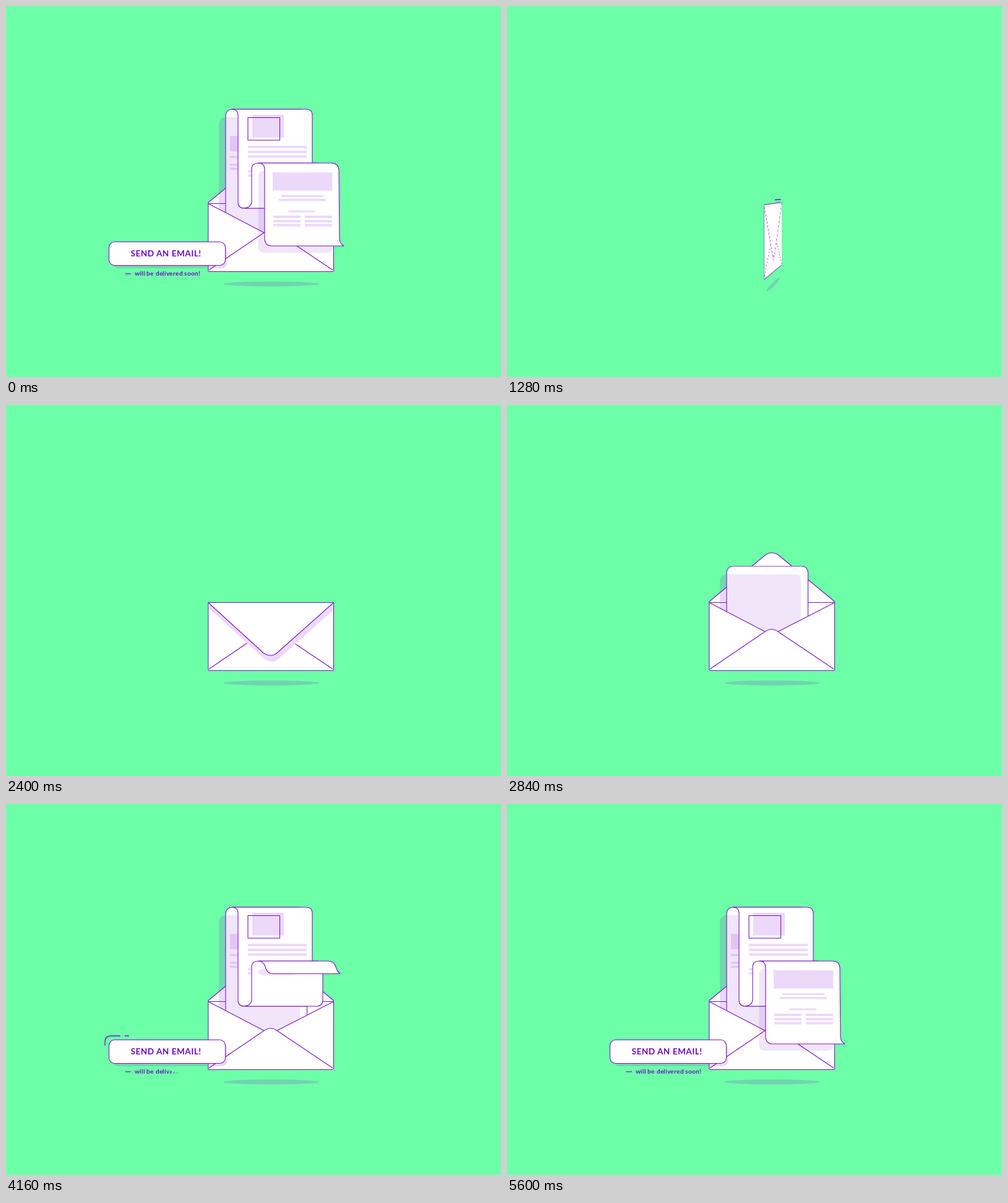
Write an HTML page without scripts that moves like this. It is 800 px wide and 600 px high and loops after 5640 ms.

```html
<!DOCTYPE html>
<html lang="en">
<head>
<meta charset="utf-8">
<title>Send an email</title>
<style>
:root { --ink: #7b16ca; --tint: #ecd9fa; --T: 5.64s linear infinite; }
html, body { margin: 0; width: 100%; height: 100%; overflow: hidden; background: #6effa9; }
body { position: relative; }
.layer { position: absolute; inset: 0; overflow: hidden; contain: paint; }
.layer > svg, .card, .card > svg { position: absolute; left: 0; top: 0; width: 800px; height: 600px; }
svg { display: block; }
.p { fill: #fff; stroke: var(--ink); stroke-width: 1.1; stroke-linejoin: round; }
.l { fill: none; stroke: var(--ink); stroke-width: 1.1; }
.t { fill: var(--tint); }
.v { fill: #7a14c9; fill-opacity: .11; }
.s { fill: #71d4b1; }

/* turning envelope */
.turn { perspective: 1111px; perspective-origin: 400px 300px; animation: turnOn 5.64s step-end infinite; }
.card { transform-style: preserve-3d; transform-origin: 428px 374.5px; animation: spin var(--T); }
.front, .back { backface-visibility: hidden; transform-origin: 428px 374.5px; }
.back { transform: rotateY(180deg); }
.zoom { transform-origin: 428px 374.5px; animation: zoom var(--T); }
.zoom.floor { transform-origin: 428.5px 449.5px; }
.wipe { animation: wipe var(--T); }
.stamp { transform-origin: 474.3px 341px; animation: stamp var(--T); }
.frame { animation: frame var(--T); }
.glint { animation: glint 5.64s step-end infinite; }
@keyframes turnOn { 0% { opacity: 0 } .71% { opacity: 1 } 28% { opacity: 0 } }
@keyframes spin {
  0%, 9.22% { transform: translateX(6.5px) rotateY(0deg) }
  11.35% { transform: translateX(5px) rotateY(0deg) }
  17.7% { transform: translateX(3.5px) rotateY(0deg); animation-timing-function: ease-in }
  21.28% { transform: translateX(3px) rotateY(-50deg) }
  22.7% { transform: translateX(3px) rotateY(-99deg); animation-timing-function: cubic-bezier(.2,.5,.5,1) }
  27.5%, 100% { transform: translateX(0) rotateY(-180deg) }
}
@keyframes zoom {
  0%, .7% { transform: scale(.3); animation-timing-function: ease-out }
  5% { transform: scale(1.12) }
  9.22% { transform: scale(1.07) }
  11.35% { transform: scale(1.035); animation-timing-function: ease-out }
  15%, 100% { transform: scale(1) }
}
@keyframes wipe {
  0%, 3% { transform: translate(-90px, -160px) }
  9.22% { transform: none }
  10.64%, 100% { transform: translate(20px, 35px) }
}
@keyframes stamp { 0%, 8% { transform: scale(0) } 9.22% { transform: scale(.47) } 11%, 100% { transform: scale(1) } }
@keyframes frame { 0%, 6% { stroke-dashoffset: 1 } 9%, 100% { stroke-dashoffset: 0 } }
@keyframes glint { 0% { opacity: 0 } 22% { opacity: 1 } 23.4% { opacity: 0 } }

/* resting envelope */
.mail { animation: mailOn 5.64s step-end infinite; }
@keyframes mailOn { 0% { opacity: 1 } .71% { opacity: 0 } 28% { opacity: 1 } }
.shut, .open { transform-origin: 428px 319.5px; }
.shut { animation: shut var(--T); }
.open { animation: open var(--T); }
@keyframes shut {
  0%, 1% { transform: scaleY(0); opacity: 0 }
  2%, 43.3% { transform: none; opacity: 1; animation-timing-function: ease-in }
  45% { transform: scaleY(0); opacity: 1 }
  45.1%, 100% { transform: scaleY(0); opacity: 0 }
}
@keyframes open {
  0%, 1% { transform: none }
  2%, 45% { transform: scaleY(0); animation-timing-function: ease-out }
  47.5% { transform: scaleY(1.1) }
  49%, 100% { transform: none }
}
.badge { transform-origin: 330px 319px; animation: badge var(--T); }
@keyframes badge {
  0%, 29.1% { transform: scale(0) }
  30.8% { transform: scale(1.15) }
  32.2%, 40.4% { transform: none }
  41.2% { transform: scale(1.12) }
  42.55%, 100% { transform: scale(0) }
}
.ring { stroke: #5a16b4; stroke-width: 1.3; animation: ring var(--T); }
@keyframes ring {
  0%, 30.5% { stroke-dasharray: 0 360; stroke-dashoffset: -90; opacity: 0 }
  30.6% { stroke-dasharray: 0 360; stroke-dashoffset: -90; opacity: 1 }
  32.6% { stroke-dasharray: 110 250; stroke-dashoffset: -95; opacity: 1 }
  34.75% { stroke-dasharray: 33 327; stroke-dashoffset: -188; opacity: 1 }
  36.2% { stroke-dasharray: 0 360; stroke-dashoffset: -226; opacity: 1 }
  36.3%, 100% { stroke-dasharray: 0 360; stroke-dashoffset: -226; opacity: 0 }
}
.tick { stroke: #5a16b4; animation: tick var(--T); transform-origin: center; transform-box: fill-box; }
@keyframes tick {
  0%, 31.5% { transform: scaleY(0) }
  33% { transform: scaleY(2.5) }
  34.75% { transform: none }
  35.6%, 100% { transform: scaleY(0) }
}

/* letter and its folds */
.rise { animation: rise var(--T); }
@keyframes rise {
  0%, 1% { transform: none }
  2%, 46.1% { transform: translateY(205px) }
  50.35% { transform: translateY(94px) }
  53.2% { transform: translateY(49px); animation-timing-function: ease-out }
  57% { transform: translateY(-8px) }
  59%, 100% { transform: none }
}
.fold1 { animation: fold1 var(--T); }
@keyframes fold1 {
  0%, 1%, 63.1%, 100% { opacity: 1; d: path("M365 167H485Q495 167 495 177V317Q495 327 485 327H385Q375 327 375 317V177Q375 167 365 167Z") }
  2%, 58.2% { opacity: 0; d: path("M365 167H485Q495 167 495 177V177Q495 187 485 187H385Q375 187 375 177V177Q375 167 365 167Z") }
  58.3% { opacity: 1; d: path("M365 167H485Q495 167 495 177V177Q495 187 485 187H385Q375 187 375 177V177Q375 167 365 167Z"); animation-timing-function: ease-in-out }
}
.fold2 { animation: fold2 var(--T); }
@keyframes fold2 {
  0%, 1%, 67.4%, 100% { opacity: 1; d: path("M385 327Q397 326 397 315V264Q397 254 408 254H502Q512 254 512 264V317Q512 327 502 327Z") }
  2%, 63.1% { opacity: 0; d: path("M385 327Q397 326 397 322V322Q397 317 408 317H502Q512 317 512 321V321Q512 327 502 327Z") }
  63.2% { opacity: 1; d: path("M385 327Q397 326 397 322V322Q397 317 408 317H502Q512 317 512 321V321Q512 327 502 327Z"); animation-timing-function: ease-in-out }
}
.fold3 { animation: fold3 var(--T); }
@keyframes fold3 {
  0%, 1%, 79%, 100% { opacity: 1; d: path("M408 254Q418 254 418 265L418 377Q419 388 429 388L546 388Q539 384 539 376L538 265Q537 254 526 254Z") }
  2%, 68% { opacity: 0; d: path("M408 254Q412 254 413 255L413 255Q414 257 418 257L514 257Q513 256 512 255L512 255Q511 254 508 254Z") }
  68.1% { opacity: 1; d: path("M408 254Q412 254 413 255L413 255Q414 257 418 257L514 257Q513 256 512 255L512 255Q511 254 508 254Z") }
  73.76% { opacity: 1; d: path("M408 254Q416 254 419 263L419 263Q422 274 431 274L540 274Q535 270 533 263L533 263Q530 254 520 254Z"); animation-timing-function: cubic-bezier(.3,.4,.4,1) }
}
.cast { animation: cast var(--T); }
@keyframes cast {
  0%, 1%, 79%, 100% { width: 121px; height: 133px }
  2%, 70% { width: 0; height: 0 }
  73.76% { width: 60px; height: 11px; animation-timing-function: cubic-bezier(.3,.4,.4,1) }
}
.fade1 { animation: fade1 var(--T); }
.fade2 { animation: fade2 var(--T); }
@keyframes fade1 { 0%, 1% { opacity: 1 } 2%, 61% { opacity: 0 } 64%, 100% { opacity: 1 } }
@keyframes fade2 { 0%, 1% { opacity: 1 } 2%, 76.6% { opacity: 0 } 79.5%, 100% { opacity: 1 } }
.grow1, .grow2 { transform-box: fill-box; transform-origin: 0 50%; }
.grow1 { animation: grow1 var(--T); }
.grow2 { animation: grow2 var(--T); }
@keyframes grow1 { 0%, 1% { transform: none } 2%, 62% { transform: scaleX(0) } 66%, 100% { transform: none } }
@keyframes grow2 { 0%, 1% { transform: none } 2%, 77.5% { transform: scaleX(0) } 82%, 100% { transform: none } }

/* button and caption */
.btn { transform-origin: 260px 400px; animation: btn var(--T); }
@keyframes btn {
  0%, 1% { transform: none }
  2%, 58.5% { transform: scale(0); animation-timing-function: ease-out }
  61.5% { transform: scale(1.06) }
  63%, 100% { transform: none }
}
.trace { stroke-width: 1.4; animation: trace var(--T); }
@keyframes trace {
  0%, 70.2% { stroke-dasharray: 0 0 0 200; stroke-dashoffset: 0; opacity: 0 }
  70.3% { stroke-dasharray: 0 0 0 200; stroke-dashoffset: 0; opacity: 1 }
  73.76% { stroke-dasharray: 37 7 7 200; stroke-dashoffset: 0; opacity: 1 }
  76.6% { stroke-dasharray: 0 0 0 200; stroke-dashoffset: -60; opacity: 1 }
  76.7%, 100% { stroke-dasharray: 0 0 0 200; opacity: 0 }
}
.dash { stroke-width: 1.3; transform-origin: 192px 433px; animation: dash var(--T); }
@keyframes dash { 0%, 1% { transform: none } 2%, 65.5% { transform: scaleX(0) } 67%, 100% { transform: none } }
.say { position: absolute; left: 208px; top: 426.4px; white-space: pre; color: #6f08c4; font: 700 10px/12px Lato, "Open Sans", sans-serif; letter-spacing: .28px; }
.say b { display: inline-block; transform-origin: 50% 78%; animation: pop var(--T); animation-delay: calc(var(--i) * 26ms - 5640ms); }
@keyframes pop { 0%, 20% { transform: none } 22%, 66.3% { transform: scale(0) } 68.3%, 100% { transform: none } }
.cta { fill: #6f08c4; font: 700 13.6px Lato, "Open Sans", sans-serif; letter-spacing: .5px; }
.one { fill: #fff; font: 700 20px "Open Sans", "Noto Sans", sans-serif; }
</style>
</head>
<body>
<svg width="0" height="0" style="position:absolute">
  <defs>
    <clipPath id="body"><rect x="327" y="320" width="202" height="109"/></clipPath>
    <clipPath id="above"><rect width="800" height="428"/></clipPath>
    <clipPath id="inner"><rect width="528.5" height="600"/></clipPath>
    <g id="pocket">
      <path class="p" d="M326.8 319.5L417 366.5Q428 359 438 366.5L529.5 319.5V428Q529.5 429.5 528 429.5H328.3Q326.8 429.5 326.8 428Z"/>
      <path class="l" d="M328 427L417 366.5M528 427L438 366.5"/>
    </g>
    <g id="flap">
      <path class="t" clip-path="url(#body)" d="M329 330L418 411Q430 419 440 411L531 330V320H327Z"/>
      <path class="p" d="M326.8 319.5L416 401Q428 409 438 401L529.5 319.5Z"/>
    </g>
  </defs>
</svg>

<div class="layer turn">
  <div class="card">
    <svg><ellipse class="s zoom floor" cx="428.5" cy="449.5" rx="77.5" ry="4"/></svg>
    <svg class="front">
      <g class="zoom">
        <rect x="326.8" y="319.5" width="202.7" height="110" rx="2" fill="#fff"/>
        <rect class="t" x="329.4" y="321.2" width="197.2" height="105.6" rx="3"/>
        <svg x="328" y="321" width="200.5" height="107.5">
          <path class="wipe" fill="#fff" d="M-161.2 274L438.8 -63V700H-161.2Z"/>
        </svg>
        <rect class="stamp" x="466.3" y="333" width="16" height="16" fill="#d9aef2"/>
        <rect class="frame" x="474.5" y="334" width="15.5" height="17" pathLength="1" stroke-dasharray="1" fill="none" stroke="#b04fd8" stroke-width="1.1"/>
        <rect x="326.8" y="319.5" width="202.7" height="110" rx="2" fill="none" stroke="#6414b8" stroke-width="1.2"/>
      </g>
    </svg>
    <svg class="back">
      <use href="#pocket"/>
      <use href="#flap"/>
    </svg>
  </div>
  <svg class="glint">
    <path d="M434 316.5H443" stroke="#71d4b1" stroke-width="2"/>
    <path d="M433 313.5L442.5 312.8" stroke="#5a16b4" stroke-width="1.4"/>
  </svg>
</div>

<div class="layer mail">
  <svg>
    <ellipse class="s" cx="428.5" cy="449.5" rx="77.5" ry="4"/>
    <path class="p open" d="M326.8 319.5V318L417 243Q428 235 439 243L529.5 318V319.5"/>
    <rect x="327" y="319.5" width="202" height="109" fill="#fff"/>
    <path class="l" d="M326.8 319.5H529.5"/>
    <g clip-path="url(#above)">
      <g class="rise">
        <rect x="344" y="180" width="131" height="300" rx="10" fill="#7a14c9" fill-opacity=".16"/>
        <rect class="p" x="355" y="167" width="131.5" height="300" rx="10"/>
        <path class="v" d="M355.6 180H465Q475 180 475 190V467H355.6Z"/>
        <path class="fade1" fill="#e3c4f6" d="M362 210H375V235H362ZM362 242.5H375V246H362ZM362 255H375V258.5H362ZM362 261.5H375V265H362Z"/>
      </g>
    </g>
    <use href="#pocket"/>
    <g class="shut"><use href="#flap"/></g>

    <path class="p fold1" d="M365 167H485Q495 167 495 177V317Q495 327 485 327H385Q375 327 375 317V177Q375 167 365 167Z"/>
    <g class="fade1">
      <rect class="t" x="398" y="176" width="51" height="36.5"/>
      <rect class="l" x="391" y="180.5" width="51.5" height="36.5"/>
    </g>
    <path class="t grow1" d="M391 226H486V230H391ZM391 234H486V238H391ZM391 241.5H486V245.5H391ZM391 265.5H486V269H391ZM391 272.5H486V276H391Z"/>
    <path class="p fold2" d="M385 327Q397 326 397 315V264Q397 254 408 254H502Q512 254 512 264V317Q512 327 502 327Z"/>
    <g clip-path="url(#inner)"><rect class="v cast" x="407.5" y="266" width="121" height="133" rx="9"/></g>
    <path class="p fold3" d="M408 254Q418 254 418 265L418 377Q419 388 429 388L546 388Q539 384 539 376L538 265Q537 254 526 254Z"/>
    <rect class="t fade2" x="431" y="269" width="96.5" height="29.5"/>
    <g class="t">
      <path class="grow2" d="M445 306H513V309H445ZM441 312H517V315.5H441ZM456.5 330.5H500V333.5H456.5Z"/>
      <path class="grow2" d="M432 339H476V343H432ZM432 346H476V350H432ZM432 352.5H476V356.5H432Z"/>
      <path class="grow2" d="M483 339H527V343H483ZM483 346H527V350H483ZM483 352.5H527V356.5H483Z"/>
    </g>

    <path class="l trace" d="M160 391V385Q160 375 170 375H260"/>
    <g class="btn">
      <rect x="172" y="386" width="185.5" height="38" rx="9" fill="#7a14c9" fill-opacity=".17"/>
      <rect class="p" x="166.5" y="381.5" width="188" height="38" rx="9"/>
      <text class="cta" x="201.5" y="405.2">SEND AN EMAIL!</text>
    </g>
    <path class="l dash" d="M192.5 433H202"/>

    <g class="badge">
      <circle class="s" cx="326" cy="319.5" r="16.5"/>
      <circle cx="330" cy="319" r="16.7" fill="#880cc6"/>
      <text class="one" x="329.5" y="326.2" text-anchor="middle">1</text>
    </g>
    <circle class="l ring" cx="330" cy="319" r="20.5" pathLength="360"/>
    <path class="l tick" d="M298.5 312.5L299.5 309.5"/>
    <path class="l tick" d="M538 393.5L538.2 398"/>
  </svg>
  <div class="say"><b style="--i:0">w</b><b style="--i:1">i</b><b style="--i:2">l</b><b style="--i:3">l</b> <b style="--i:5">b</b><b style="--i:6">e</b> <b style="--i:8">d</b><b style="--i:9">e</b><b style="--i:10">l</b><b style="--i:11">i</b><b style="--i:12">v</b><b style="--i:13">e</b><b style="--i:14">r</b><b style="--i:15">e</b><b style="--i:16">d</b> <b style="--i:18">s</b><b style="--i:19">o</b><b style="--i:20">o</b><b style="--i:21">n</b><b style="--i:22">!</b></div>
</div>
</body>
</html>
```
